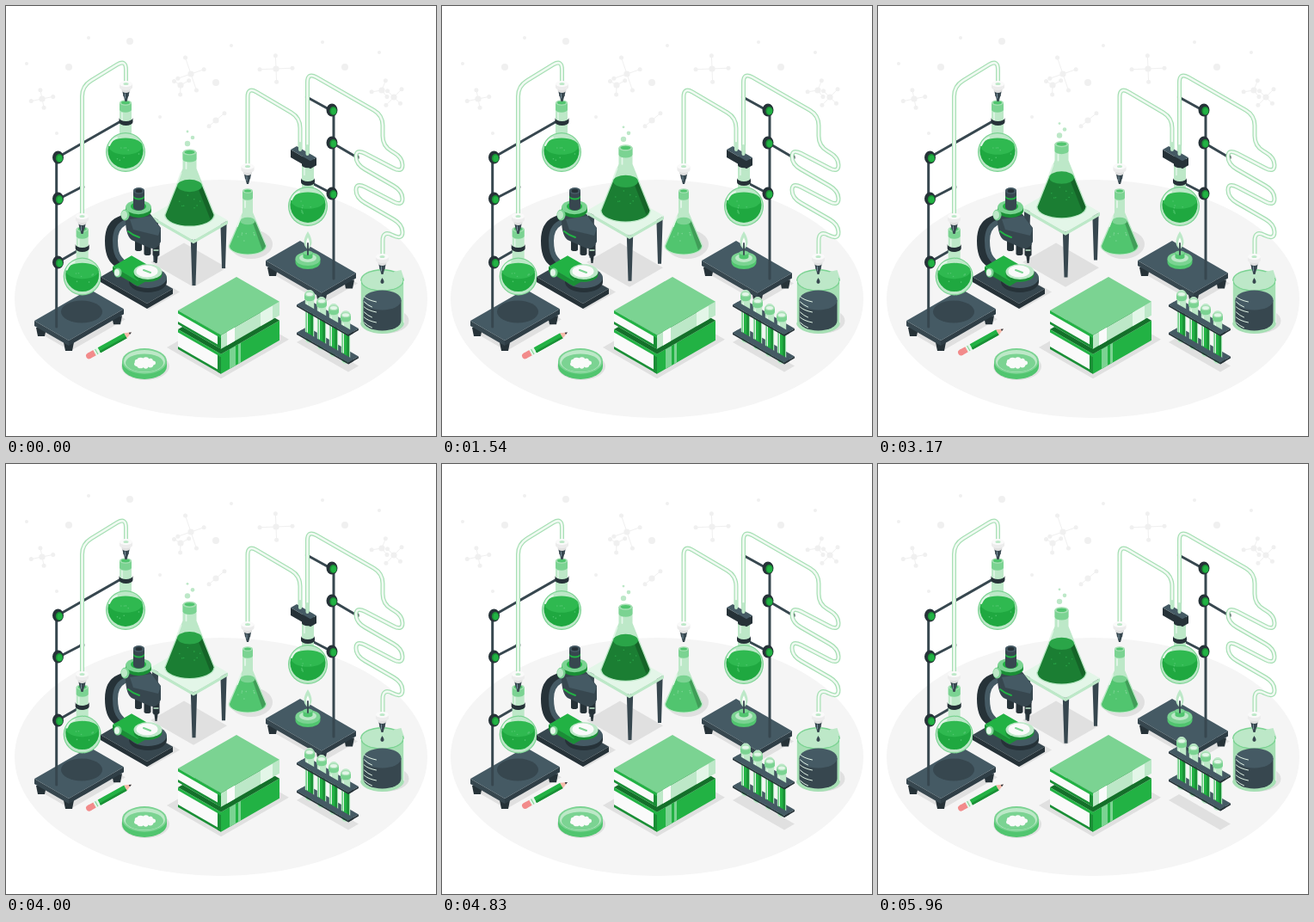
Animation, 500 px wide and 500 px high, one loop 6 s. Source, as an HTML page:

```html
<!DOCTYPE html>
<html lang="en">
<head>
<meta charset="utf-8">
<title>Chemistry lab</title>
<style>
html, body { margin: 0; width: 100%; height: 100%; overflow: hidden; background: #fff; }
svg { display: block; width: 100%; height: 100%; }
</style>
</head>
<body>
<svg id="stage" viewBox="0 0 500 500"></svg>
<script>
const ink = '#263238', dark = '#37474f', slate = '#455a64';
const green = '#22b244', deep = '#1a8f36', forest = '#14702a';
const leaf = '#51c56f', mid = '#7bd392', soft = '#a6dfb4', pale = '#bde8c8', mist = '#e3f6e8';
const shade = '#e0e0e0', faint = '#f0f0f0', white = '#fafafa';
const SLOPE = .575; // rise over run of both isometric axes

let seed = 7;
const random = () => (seed = seed * 16807 % 2147483647) / 2147483647;
const range = n => [...Array(n).keys()];

const oval = (x, y, rx, ry = rx, fill = green) => `<ellipse cx="${x}" cy="${y}" rx="${rx}" ry="${ry}" fill="${fill}"/>`;
const shape = (d, fill) => `<path d="${d}" fill="${fill}"/>`;
const line = (d, color, w) => `<path d="${d}" fill="none" stroke="${color}" stroke-width="${w}" stroke-linecap="round" stroke-linejoin="round"/>`;
const group = (id, body) => `<g id="${id}">${body}</g>`;

// Flat isometric rectangle from its left corner: a runs down-right, b up-right.
const tile = (x, y, a, b, fill) =>
  shape(`M${x} ${y}l${a} ${a * SLOPE}l${b} ${-b * SLOPE}l${-a} ${-a * SLOPE}z`, fill);
// Upright walls of height h along either axis.
const wallA = (x, y, a, h, fill) => shape(`M${x} ${y}l${a} ${a * SLOPE}v${h}l${-a} ${-a * SLOPE}z`, fill);
const wallB = (x, y, b, h, fill) => shape(`M${x} ${y}l${b} ${-b * SLOPE}v${h}l${-b} ${b * SLOPE}z`, fill);
const slab = (x, y, a, b, h, top, left, right = left) =>
  wallA(x, y, a, h, left) + wallB(x + a, y + a * SLOPE, b, h, right) + tile(x, y, a, b, top);

const cylinder = (x, y, rx, ry, h, side, top) =>
  shape(`M${x - rx} ${y}v${h}a${rx} ${ry} 0 0 0 ${2 * rx} 0v${-h}z`, side) + oval(x, y, rx, ry, top);
const taper = (x, y, w, h, tip, fill) =>
  shape(`M${x - w} ${y}h${2 * w}L${x + tip} ${y + h}h${-2 * tip}z`, fill);
const speckle = (x, y, r, fill) => range(8).map(() => {
  const angle = random() * 2 * Math.PI, far = r * Math.sqrt(random());
  return oval(x + far * Math.cos(angle), y + far * Math.sin(angle) * .6, .8, .8, fill);
}).join('');
const mouth = (x, y, r) => cylinder(x, y, r, r * .45, 8, mid, soft) + oval(x, y, r - 2, r * .27, leaf);

// Polyline whose corners are rounded off.
function rounded(points, r = 12) {
  const toward = ([x, y], [u, v]) => {
    const size = Math.hypot(u - x, v - y), k = Math.min(r, size / 2) / size;
    return `${x + (u - x) * k} ${y + (v - y) * k}`;
  };
  return points.map((p, i) => {
    const before = points[i - 1], after = points[i + 1];
    if (!before || !after) return `${before ? 'L' : 'M'}${p.join(' ')}`;
    return `L${toward(p, before)}Q${p.join(' ')} ${toward(p, after)}`;
  }).join('');
}
function hose(points) {
  const d = rounded(points);
  return line(d, soft, 5) + line(d, '#f0faf2', 2.6);
}

// Hub with evenly spread bonds of alternating length.
const molecule = (x, y, bonds, size, turn) => range(bonds).map(i => {
  const angle = turn + i * 2 * Math.PI / bonds, far = size * (i % 2 ? .8 : 1);
  const u = x + far * Math.cos(angle), v = y + far * Math.sin(angle);
  return line(`M${x} ${y}L${u} ${v}`, faint, 1) + oval(u, v, 2.5, 2.5, faint);
}).join('') + oval(x, y, 3.6, 3.6, faint);

function backdrop() {
  const big = [[73, 71], [144, 41], [244, 89], [394, 71]];
  const small = [[24, 67], [96, 37], [262, 46], [368, 42], [434, 54], [59, 148], [179, 129]];
  return oval(250, 340.5, 240, 138.5, '#f5f5f5')
    + big.map(([x, y]) => oval(x, y, 4, 4, faint)).join('')
    + small.map(([x, y]) => oval(x, y, 2, 2, faint)).join('')
    + molecule(42, 108, 4, 13, -.2) + molecule(215, 79, 4, 20, -1.9) + molecule(203, 92, 3, 11, 1.6)
    + molecule(314, 73, 4, 19, 3.1) + molecule(244, 133, 2, 13, -.7)
    + molecule(437, 98, 3, 12, -1.2) + molecule(451, 106, 4, 13, -.8);
}

function dropper(x, y) {
  return taper(x, y + 4, 4.3, 7, 3, dark) + taper(x, y + 10, 3, 7, 1, dark)
    + line(`M${x - 1} ${y + 8}v5`, '#78909c', 1)
    + cylinder(x, y - 1, 5, 3, 5, shade, shade)
    + cylinder(x, y - 3.5, 7.5, 3.6, 4, '#ececec', white) + oval(x, y - 3.5, 3, 1.5, pale);
}

function roundFlask(x, y, r) {
  const top = y - r * 2.5, level = y - r * .3, w = r * .86;
  return shape(`M${x - 7} ${top}v${r * 1.7}h14v${-r * 1.7}z`, pale)
    + oval(x, y, r, r, mid) + oval(x, y, r - 1.2, r - 1.2, pale)
    + shape(`M${x - w} ${level}A${r - 2.5} ${r - 2.5} 0 1 0 ${x + w} ${level}z`, '#1fa840')
    + oval(x, level, w, r * .42, '#2fb950')
    + speckle(x, y + 2, r * .7, leaf)
    + line(`M${x - r + 4} ${y - 8}q3-7 9-9`, mist, 2)
    + line(`M${x - 4} ${top + 12}v9`, mist, 1.5) + mouth(x, top, 7);
}

function coneFlask(x, top, n, shoulder, base, r, level, body, surface) {
  const side = y => n + (r - n) * (y - shoulder) / (base - shoulder) - 1.5;
  const w = side(level), foot = side(base);
  return shape(`M${x - n} ${top}V${shoulder}L${x - r} ${base}a${r} ${r * .47} 0 0 0 ${2 * r} 0L${x + n} ${shoulder}V${top}z`, pale)
    + shape(`M${x - w} ${level}L${x - foot} ${base}a${foot} ${foot * .45} 0 0 0 ${2 * foot} 0L${x + w} ${level}z`, body)
    + shape(`M${x + w * .6} ${level}L${x + w} ${level}L${x + foot} ${base}l-4 5z`, '#0003')
    + oval(x, level, w, w * .5, surface)
    + speckle(x, (level + base) / 2 + 4, r * .6, surface)
    + line(`M${x - n - 2} ${shoulder + 5}l-4 11M${x - n / 2} ${top + 12}v7`, mist, 1.8)
    + mouth(x, top, n);
}

const ring = (x, y) => shape(`M${x - 8} ${y - 3}v5a8 4 0 0 0 16 0v-5a8 4 0 0 1-16 0`, ink);
const knob = (x, y) => oval(x, y, 6.5, 7.5, ink) + oval(x + 1.5, y + 1, 4.2, 5, deep) + oval(x + 2, y + 1.2, 3, 3.8, green);

function base(x, y, a, b) {
  const foot = (u, v) => taper(u, v, 6, 10, 4, ink);
  return tile(x + 2, y + 12, a, b, shade)
    + foot(x + 8, y + 8) + foot(x + a, y + a * SLOPE + 2) + foot(x + a + b - 8, y + (a - b) * SLOPE + 8)
    + slab(x, y, a, b, 6, slate, dark, '#2f3e46');
}

function leftStand() {
  return base(33, 366, 40, 64) + oval(88, 355.5, 24, 13, dark)
    + line('M58.7 176V373M60 176L137 132M60 225L89 210M60 298L86 283', dark, 3)
    + oval(88.5, 210.5, 2.8, 3, ink)
    + [176, 224, 298].map(y => knob(60.5, y)).join('')
    + hose([[88.5, 246], [88.5, 93], [139.5, 62], [139.5, 91]])
    + roundFlask(139, 170, 23) + ring(139.5, 133) + dropper(139.5, 94)
    + roundFlask(88.7, 314.5, 22) + ring(88.7, 280) + dropper(88.5, 248);
}

function rightStand() {
  const coil = range(2).flatMap(i => [[461, 176], [461, 194], [407, 166], [407, 184]].map(([x, y]) => [x, y + 39 * i]));
  return base(302, 296, 65, 40)
    + line('M381 120V317M350 106L379 122M379 159L408 176M352 204L379 218', dark, 3)
    + oval(350.5, 106, 2.6, 3, ink) + oval(408, 176, 2.6, 3, ink)
    + [121, 159, 218].map(y => knob(379, y)).join('')
    + hose([[281, 187], [281, 94], [342, 130], [342, 168]])
    + hose([[350.5, 171], [350.5, 77], [438, 127], [438, 163], ...coil, [461, 254], [461, 272], [438, 261], [438, 292]])
    + roundFlask(351, 233, 23) + cylinder(351, 177, 7, 3.2, 8, ink, ink)
    + slab(331, 167, 23, 7, 9, slate, ink) + line('M342 160V167M350.5 163V172', pale, 4)
    + ring(351, 203) + burner(351, 294);
}

function burner(x, y) {
  const flame = (top, w, h, fill) => shape(`M${x} ${top}q${-2 * w} ${h * .7} 0 ${h}q${2 * w} ${-h * .3} 0 ${-h}`, fill);
  return cylinder(x, y, 14.5, 8, 4, leaf, mid) + oval(x, y - 1, 10, 5, pale)
    + cylinder(x, y - 7, 5.5, 2.6, 5, leaf, mid)
    + flame(262, 4.5, 21, pale) + flame(269, 2, 12, '#fff') + line(`M${x} 276v13`, dark, 1.8);
}

function desk() {
  const leg = (x, y, h) => taper(x, y, 3.7, h, 2, dark);
  return leg(173.5, 246, 52) + leg(253, 250, 55) + leg(218.5, 271, 54)
    + slab(168, 243.5, 50, 40, 4, mist, pale)
    + coneFlask(213.5, 170, 8, 189, 243, 29.5, 209, '#1b7e33', '#2aa548')
    + range(3).map(i => oval(211 + i % 2 * 6, 160 - 7 * i, 3.2 - i * .9, 3.2 - i * .9, pale)).join('');
}

function microscope() {
  const arm = rounded([[143, 246], [121, 256], [121, 290], [135, 302]], 20);
  const lens = (x, y, h) => cylinder(x, y, 4, 2, h, ink, ink);
  return tile(110, 321, 56, 36, shade)
    + slab(110, 315, 54, 30, 6, dark, ink)
    + line(arm, ink, 12) + line(rounded([[147, 247], [127, 258], [127, 288], [138, 300]], 20), slate, 6)
    + cylinder(165, 316, 22, 12, 5, ink, slate)
    + slab(124, 303, 29, 22, 6, green, deep)
    + cylinder(165, 309, 16.5, 9, 3, deep, pale) + oval(164, 308.5, 12.5, 7, white) + line('M160 307l8 3', mid, 2)
    + oval(130, 310, 4.5, 5.5, mid) + oval(129, 310, 3, 4, mist)
    + lens(154, 270, 13) + lens(164.5, 274, 14) + lens(174.5, 277, 12) + taper(174.5, 284, 3, 15, 1, ink)
    + line('M172 284h5', pale, 1.4)
    + shape('M139 241L168 242L180 258V274Q175 286 164 280L146 272Q138 266 139 241', dark)
    + shape('M144 248L169 244L180 259L177 267L148 260z', slate)
    + line('M142 262q6 5 13 7', green, 2)
    + cylinder(154, 234, 15, 8.2, 4, deep, mid) + oval(154, 233, 9, 5, green)
    + cylinder(154.5, 215, 6.5, 3.8, 19, dark, slate) + cylinder(154.5, 220, 6.5, 3.6, 2, green, dark)
    + cylinder(154.5, 215, 6.5, 3.8, 3, dark, slate) + oval(154.5, 215, 4, 2.2, ink)
    + oval(138.5, 243, 5, 6.5, mid) + oval(137.5, 243, 3.5, 5, pale);
}

function beaker(x) {
  const marks = range(6).map(i => line(`M${x - 21} ${338 + i * 6}q4 4 ${i % 2 ? 9 : 14} 6`, mist, 1)).join('');
  return oval(x + 4, 366, 27, 15, shade)
    + cylinder(x, 319, 25.5, 13, 49, soft, mid) + oval(x, 319, 24, 11.5, pale)
    + shape(`M${x + 13} 309l9-2 3 9-5 1z`, pale)
    + cylinder(x, 342, 22, 11.5, 24, dark, slate) + marks
    + line(`M${x - 25} 320v48M${x + 25} 320v48`, mist, 1)
    + dropper(x, 295) + shape(`M${x} 316q-4 6 0 7q4-1 0-7`, dark);
}

// Closed book: open page edge on the left wall, spine on the right wall.
function book(y, h, cover, spine, edge, bands) {
  const x = 200, a = 50, b = 68, corner = y + a * SLOPE;
  const band = ([at, w, fill]) => wallB(x + a + at, corner - at * SLOPE, w, h, fill);
  return wallA(x, y, a, h, white) + wallA(x, y + h - 3, a, 3, edge) + wallA(x + a - 4, corner - 4 * SLOPE, 4, h, edge)
    + wallB(x + a, corner, b, h, spine) + bands.map(band).join('')
    + tile(x, y, a, b, cover) + wallA(x, y, a, 3.5, green);
}
const books = () => tile(187, 397, 63, 79, shade)
  + book(376, 23, forest, green, deep, [[10, 7, mid], [20, 3, mid]])
  + book(354, 16, mid, pale, deep, [[7, 9, white], [46, 14, mist]]);

function dish(x, y) {
  const blot = range(9).map(i => oval(x + 9 * Math.cos(i * .7), y + 2 + 4 * Math.sin(i * .7), 4 - i % 3 * .6, 2.8, white)).join('');
  return oval(x + 1, y + 6, 28, 16, shade)
    + cylinder(x, y, 26, 15, 6, leaf, mid) + oval(x, y, 24, 13, pale) + oval(x, y + 2, 22, 10.5, mid)
    + blot + oval(x, y + 2, 9, 5, white);
}

function pencil() {
  const part = (from, to, fill) => line(`M${from} 0H${to}`, fill, 7).replace('round', 'butt');
  const body = oval(3.5, 0, 3.5, 3.5, '#f28b8b') + part(3.5, 11, '#f28b8b') + part(11, 17, mist) + part(13, 14, mid)
    + part(17, 52, green) + shape('M17 1H52V3.5H17z', deep)
    + shape('M52-3.5L60 0L52 3.5z', '#f6b9a9') + shape('M57-1.3L60 0L57 1.3z', ink);
  return `<g transform="translate(93.5 408.5) rotate(-29)">${body}</g>`;
}

function tube(x, y) {
  return cylinder(x, y, 5.2, 5, 52, pale, pale) + cylinder(x, y + 20, 4.2, 4, 31, green, green)
    + line(`M${x + 2.7} ${y + 22}v29`, deep, 2.6) + oval(x, y + 20, 4.2, 2, mid)
    + line(`M${x - 2.7} ${y + 10}v34`, mist, 1.4)
    + cylinder(x, y, 6, 3.2, 5, mid, soft) + oval(x, y, 4, 2, mist);
}

function rack() {
  const trays = [380, 347.5];
  return trays.map(y => tile(338, y, 60, 12, slate)).join('')
    + range(4).map(i => tube(353 + 14 * i, 335 + 14 * i * SLOPE)).join('')
    + trays.map(y => slab(338, y, 60, 6, 2, slate, ink) + wallB(398, y + 60 * SLOPE, 12, 2, ink)).join('');
}

stage.innerHTML = backdrop()
  + tile(168, 298, 50, 39, shade)
  + leftStand() + group('desk', desk()) + microscope() + rightStand()
  + oval(285, 277, 25, 17, shade) + coneFlask(281, 215, 6, 240, 279, 22.5, 250, leaf, mid) + dropper(281, 190)
  + beaker(437.5) + books() + dish(161, 413)
  + group('pen', pencil())
  + tile(338, 391, 60, 12, shade) + group('rack', rack());

// Each floater waits, then rises and sinks linearly, three seconds each way.
const floaters = [['desk', 0, 10], ['pen', 2000, 10], ['rack', 4000, 20]]
  .map(([id, delay, height]) => ({ node: document.getElementById(id), delay, height }));

function draw() {
  const t = performance.now() % 6000;
  for (const { node, delay, height } of floaters) {
    const phase = Math.max(0, t - delay) / 3000;
    node.setAttribute('transform', `translate(0 ${-height * (1 - Math.abs(1 - phase))})`);
  }
  requestAnimationFrame(draw);
}
draw();
</script>
</body>
</html>
```
